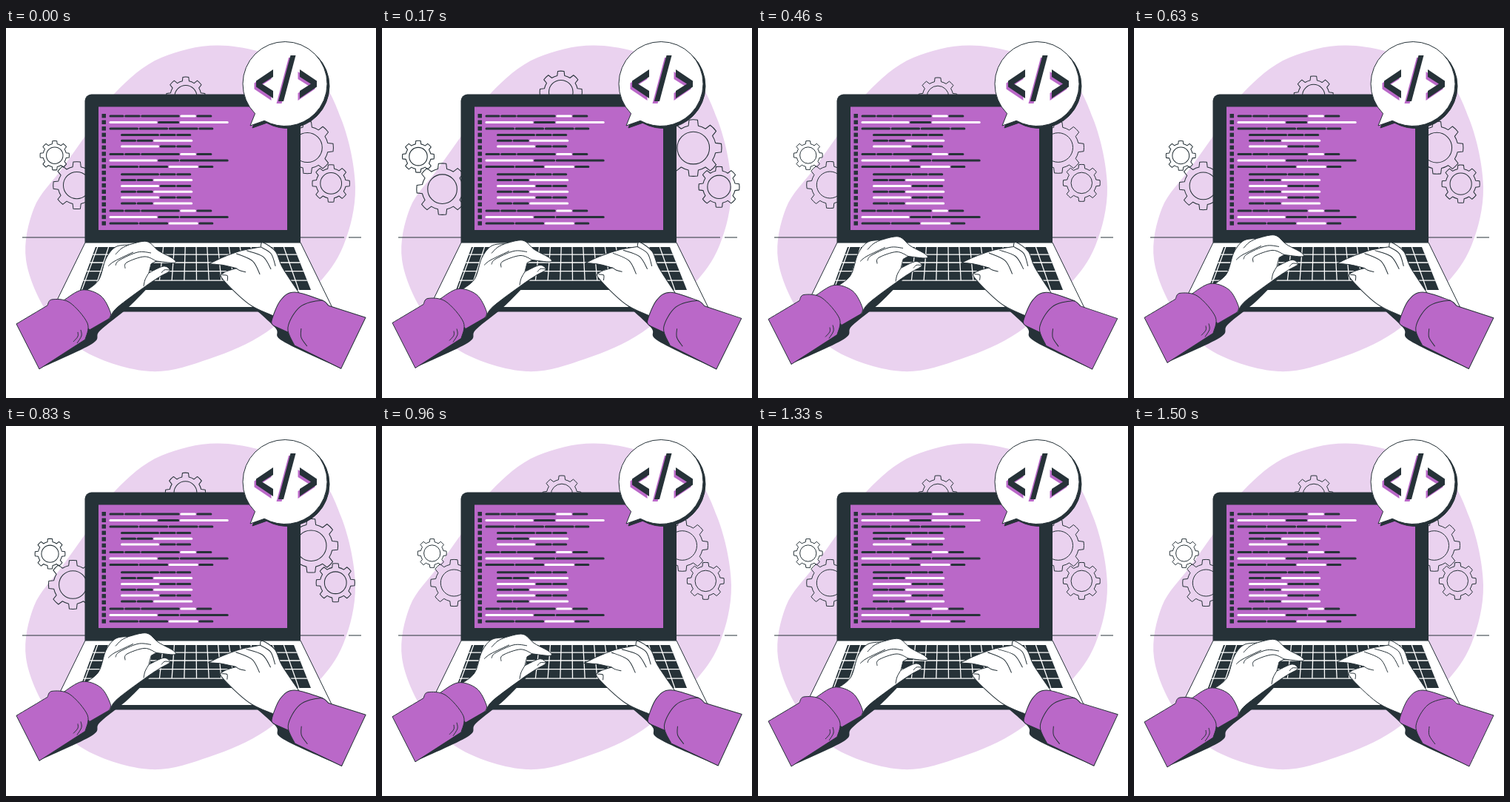
Recreate the animation shown at these times as an HTML page with a canvas. Size 500 px wide and 500 px high, loop 1.54 s.

```html
<!DOCTYPE html>
<html lang="en">
<head>
<meta charset="utf-8">
<title>Typing on a laptop</title>
<style>
html, body { margin: 0; width: 100%; height: 100%; overflow: hidden; background: #fff; }
canvas { display: block; width: 100vmin; height: 100vmin; }
</style>
</head>
<body>
<canvas id="stage"></canvas>
<script>
const canvas = document.getElementById('stage');
const ctx = canvas.getContext('2d');
const DARK = '#263238', PURPLE = '#ba68c8', PALE = '#ead2ef', WHITE = '#fff';
const LOOP = 1540, STEPS = 37, FPS = 24;

function paint(fill, stroke) {
  if (fill) { ctx.fillStyle = fill; ctx.fill(); }
  if (stroke) { ctx.strokeStyle = stroke; ctx.lineWidth = 1; ctx.stroke(); }
}

// Smooth curve through flat x, y points, continuing the current path.
function spline(p, wrap) {
  const n = p.length / 2;
  const at = i => {
    const k = wrap ? (i + n) % n : Math.max(0, Math.min(n - 1, i));
    return [p[2 * k], p[2 * k + 1]];
  };
  ctx.lineTo(p[0], p[1]);
  for (let i = 0; i < (wrap ? n : n - 1); i++) {
    const [a, b, c, d] = [at(i - 1), at(i), at(i + 1), at(i + 2)];
    ctx.bezierCurveTo(b[0] + (c[0] - a[0]) / 6, b[1] + (c[1] - a[1]) / 6,
      c[0] - (d[0] - b[0]) / 6, c[1] - (d[1] - b[1]) / 6, c[0], c[1]);
  }
}

// Closed outline of smooth runs that meet in corners.
function shape(fill, stroke, ...runs) {
  ctx.beginPath();
  runs.forEach(run => spline(run));
  ctx.closePath();
  paint(fill, stroke);
}

function curve(...points) {
  ctx.beginPath();
  spline(points);
  paint(null, DARK);
}

function polyPath(points) {
  ctx.beginPath();
  for (let i = 0; i < points.length; i += 2) ctx.lineTo(points[i], points[i + 1]);
  ctx.closePath();
}

function segment(x1, y1, x2, y2, color, width) {
  ctx.beginPath();
  ctx.moveTo(x1, y1);
  ctx.lineTo(x2, y2);
  ctx.strokeStyle = color;
  ctx.lineWidth = width;
  ctx.stroke();
}

function box(x, y, w, h, radii, color) {
  ctx.beginPath();
  ctx.roundRect(x, y, w, h, radii);
  paint(color);
}

function around(x, y, change, drawPart) {
  ctx.save();
  ctx.translate(x, y);
  change();
  ctx.translate(-x, -y);
  drawPart();
  ctx.restore();
}

function drawBlob() {
  ctx.beginPath();
  spline([300, 24, 410, 58, 453, 123, 472, 215, 456, 294, 418, 350, 352, 411, 275, 447, 195, 464,
    108, 438, 57, 387, 27, 313, 38, 243, 75, 191, 110, 142, 148, 87, 210, 40], true);
  paint(PALE);
}

function gear(x, y, tip) {
  const root = tip * 0.8, turn = Math.PI / 4;
  ctx.beginPath();
  for (let a = 0; a < 7.9 * turn; a += turn) {
    ctx.arc(x, y, root, a - turn + 0.22, a - 0.22);
    ctx.arc(x, y, tip, a - 0.15, a + 0.15);
  }
  ctx.closePath();
  paint(null, DARK);
  ctx.beginPath();
  ctx.arc(x, y, tip * 0.57, 0, 7);
  paint(null, DARK);
}

const ease = u => (1 - Math.cos(Math.PI * Math.max(0, Math.min(1, u)))) / 2;
const pulse = (p, start, peak, end) =>
  p < peak ? ease((p - start) / (peak - start)) : ease((end - p) / (end - peak));

function drawGears(p) {
  const s = 1 + 0.1 * (pulse(p, 0, 0.13, 0.32) + pulse(p, 0.4, 0.5, 0.625));
  around(255.2, 155.5, () => ctx.scale(s, s), () => {
    gear(243, 93, 26);
    gear(97.3, 212, 31.6);
    gear(67.7, 172, 19.5);
    gear(405.7, 161.5, 34.8);
    gear(437.3, 209.4, 25);
  });
}

// One code line: bar widths, and per bar a colour letter (d or w).
function codeLine(x, y, widths, colors) {
  widths.forEach((w, i) => {
    segment(x, y, x + w, y, colors[i] === 'w' ? WHITE : DARK, 3);
    x += w + 3.6;
  });
}

function codeBlock(top, listColors, longColors) {
  codeLine(141, top, [17, 18.5, 49.5, 18.5, 18], 'dddwd');
  codeLine(141, top + 8.5, [62, 26, 63], longColors);
  codeLine(141, top + 17, [36.5, 36.5, 37, 17], listColors);
}

function indentedBlock(top, kinds) {
  const bars = [49, 19, 17];
  [...kinds].forEach((kind, i) => {
    const y = top + i * 7.85;
    if (kind === 'r') codeLine(156.5, y, [18, 19, 50], 'ddw');
    else codeLine(156.5, y, bars, kind + 'dd');
  });
}

function drawScreen() {
  box(106.5, 89.5, 291.5, 200.5, [9, 9, 0, 0], DARK);
  box(125, 106.5, 255, 166.5, 0, PURPLE);
  for (let i = 0; i < 18; i++) box(129.5, 116 + i * 8.54, 5.5, 5.5, 0, DARK);
  ctx.lineCap = 'round';
  codeBlock(118.9, 'dddd', 'wdw');
  indentedBlock(144.4, 'drw');
  codeBlock(170.5, 'ddwd', 'wdd');
  indentedBlock(197.7, 'drwrwr');
  codeBlock(247, 'ddwd', 'wdd');
  ctx.lineCap = 'butt';
}

function drawBase() {
  polyPath([107, 290, 398, 290, 441, 378, 64, 378]);
  paint(WHITE, DARK);
  box(64, 377, 377.5, 6.5, [0, 0, 4, 4], DARK);
  ctx.save();
  polyPath([121, 296, 389, 296, 412, 354, 100, 354]);
  paint(DARK);
  ctx.clip();
  for (let row = 1, y = 296; row <= 4; row++) {
    y += 9.3 + row * 0.8;
    segment(90, y, 420, y, WHITE, 1.3);
  }
  for (let k = -9; k <= 8; k++) {
    const x = 257 + k * 14.8, slope = (x - 253) / 350;
    const length = k > 5 || k < -6 ? 58 : 45;
    segment(x, 296, x + slope * length, 296 + length, WHITE, 1.3);
  }
  ctx.restore();
}

function bubble(shift, fill) {
  ctx.beginPath();
  ctx.arc(377 + shift, 75.5 + shift, 57, 2.36, 2.08 + 2 * Math.PI);
  ctx.lineTo(330 + shift, 132 + shift);
  ctx.closePath();
  paint(fill, DARK);
}

function codeMark(dx, dy, color) {
  ctx.save();
  ctx.translate(379 + dx, 75.5 + dy);
  for (const side of [-1, 1]) {
    polyPath([18, -19.5, 18, -9.5, 33, 0, 18, 9.5, 18, 19.5, 41, 4, 41, -4]
      .map((v, i) => i % 2 ? v : v * side));
    paint(color);
  }
  polyPath([5.5, -38.5, 12.5, -38.5, -4, 23.5, -11, 23.5]);
  paint(color);
  ctx.restore();
}

function drawBubble() {
  bubble(3, DARK);
  bubble(0, WHITE);
  codeMark(-2.5, 3, PURPLE);
  codeMark(0, 0, DARK);
}

function drawLeftHand() {
  shape(DARK, null, [44, 461, 116, 427, 127, 409, 166, 377, 203, 339], [100, 390]);
  shape(WHITE, DARK,
    [105, 357, 125, 341, 135, 312, 148, 296, 166, 293],
    [166, 293, 190, 288.5, 206, 301, 226, 312, 227, 317.5, 203, 315],
    [196, 319, 193, 331],
    [193, 331, 213, 322, 221, 328, 208, 336, 190, 348, 150, 378, 140, 393],
    [110, 390]);
  curve(148, 306, 156, 298, 166, 293);
  curve(138, 322, 147, 315, 172, 303);
  curve(148, 321, 153, 314, 178, 303, 196, 304);
  curve(161, 325, 163, 317, 187, 309, 203, 315);
  curve(186, 349, 188, 340, 193, 331);
  curve(210, 331, 214, 327, 220, 327);
  shape(PURPLE, DARK, [78, 368, 103, 354, 128, 362, 141, 384, 139, 393], [113, 408]);
  shape(PURPLE, DARK, [14, 400, 56, 375],
    [56, 375, 62, 367, 86, 371, 110, 399, 107, 421], [45, 461]);
  curve(97, 411, 97, 417, 91, 424);
  curve(101, 408, 102, 416, 96, 426);
}

function drawRightHand() {
  shape(DARK, null, [318, 364, 363, 404, 374, 423, 453, 460], [400, 390]);
  shape(WHITE, DARK,
    [396, 358, 373, 323, 364, 302, 347, 290, 344, 296],
    [344, 296, 318, 301, 293, 310, 274, 319],
    [274, 319, 292, 320.5, 311, 325],
    [311, 325, 294, 331, 293, 340, 328, 373, 361, 389],
    [390, 390]);
  curve(311, 305, 333, 315, 343, 333);
  curve(325, 301, 347, 309, 358, 326);
  curve(344, 296, 358, 305, 364, 322);
  curve(311, 325, 316, 328, 324, 330);
  curve(292, 334, 299, 335, 299, 342);
  shape(PURPLE, DARK, [428, 368, 390, 357, 371, 368, 359, 396, 363, 403], [383, 412]);
  shape(PURPLE, DARK, [486, 391, 453, 460],
    [390, 429, 381, 405, 397, 377, 425, 368, 436, 375]);
  curve(399, 406, 399, 418, 407, 430);
}

function draw(p) {
  ctx.fillStyle = WHITE;
  ctx.fillRect(0, 0, 500, 500);
  drawBlob();
  drawGears(p);
  segment(22, 283, 457, 283, DARK, 1);
  segment(463, 283, 480, 283, DARK, 1);
  drawBase();
  drawScreen();
  drawBubble();
  const lift = 9 * Math.sin(Math.PI * p) ** 2;
  const sway = Math.sin(2 * Math.PI * p) * Math.PI / 180;
  around(0, 0, () => ctx.translate(0, -lift), drawLeftHand);
  around(380, 375, () => ctx.rotate(sway), drawRightHand);
}

function tick() {
  const size = Math.round(Math.min(innerWidth, innerHeight) * devicePixelRatio);
  if (canvas.width !== size) canvas.width = canvas.height = size;
  ctx.setTransform(size / 500, 0, 0, size / 500, 0, 0);
  ctx.lineJoin = 'round';
  const t = performance.now() % LOOP;
  const step = Math.min(STEPS - 1, Math.floor((t + 4) * FPS / 1000));
  draw((step + 1) % STEPS / STEPS);
  requestAnimationFrame(tick);
}
tick();
</script>
</body>
</html>
```
